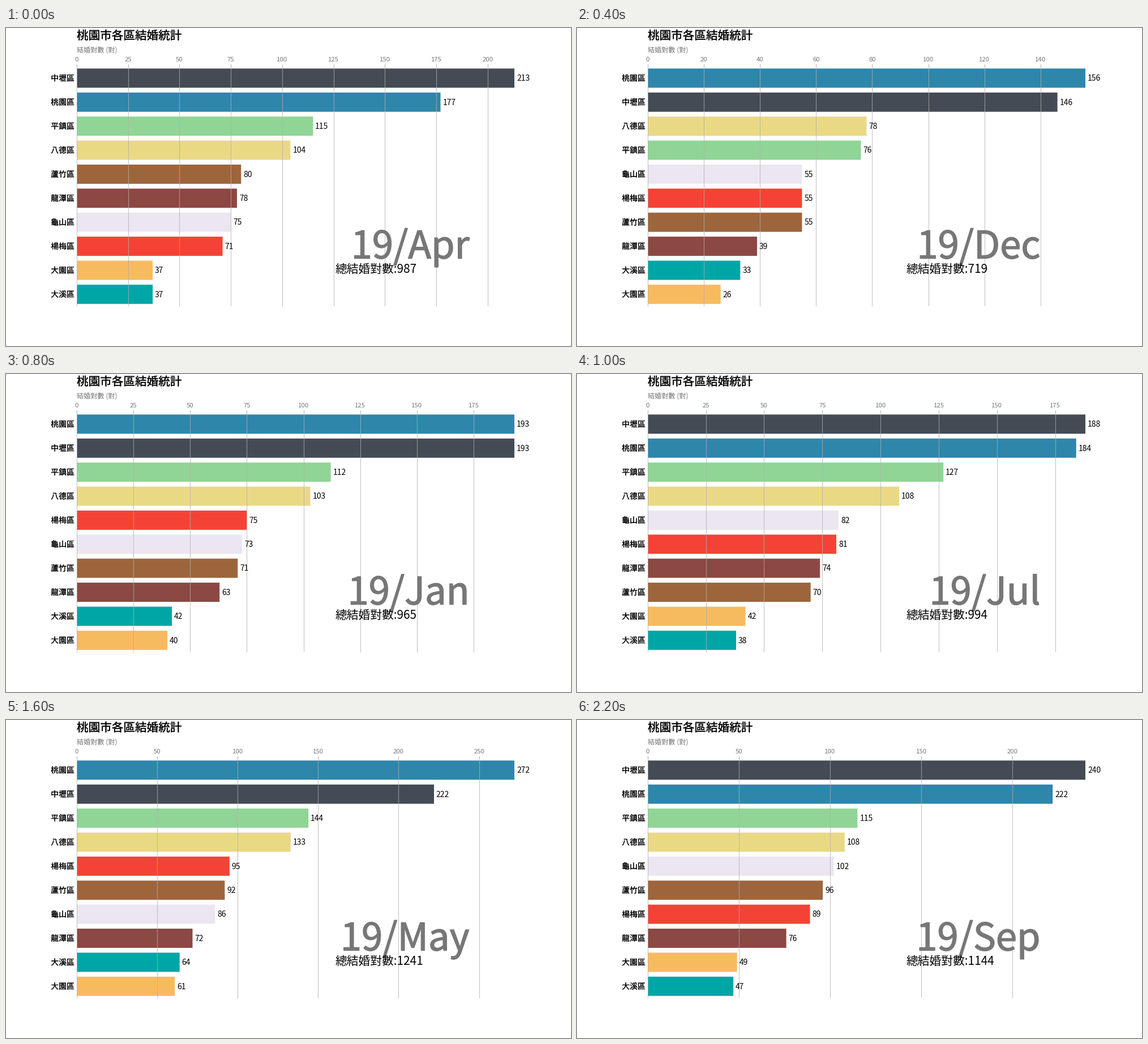
Recreate the animation shown at these times as a matplotlib script. Size 998x561 px, loop 2400 ms.

```python
import numpy as np
import matplotlib.pyplot as plt
from matplotlib.animation import FuncAnimation
from matplotlib.patheffects import withStroke

W, H, DPI = 998, 561, 72  # at 72 dpi one point is one pixel
GREY = "#777777"
MONTHS = "Apr Aug Dec Feb Jan Jul Jun Mar May Nov Oct Sep".split()

COLORS = {
    "桃園區": "#2e86ab", "中壢區": "#444b54", "平鎮區": "#90d595",
    "八德區": "#e9d985", "龜山區": "#ebe6f0", "楊梅區": "#f44336",
    "蘆竹區": "#9d653c", "龍潭區": "#8c4843", "大園區": "#f7bb5f",
    "大溪區": "#00a6a6",
}

# key months: marriages per district, in the order of COLORS
KEYS = {
    "Apr": (177, 213, 115, 104, 75, 71, 80, 78, 37, 37),
    "Aug": (109, 94, 55, 57, 46, 41, 38, 26, 15, 20),
    "Feb": (202, 198, 97, 98, 64, 69, 72, 52, 38, 46),
    "Jul": (184, 188, 127, 108, 82, 81, 70, 74, 42, 38),
    "Jun": (221, 219, 132, 122, 85, 99, 87, 49, 53, 58),
    "May": (272, 222, 144, 133, 86, 95, 92, 72, 61, 64),
    "Sep": (222, 240, 115, 108, 102, 89, 96, 76, 49, 47),
}
KEY_POS = [MONTHS.index(m) for m in KEYS]


def counts(i):
    """Values of month i; months between keys are interpolated."""
    return [round(np.interp(i, KEY_POS, track)) for track in zip(*KEYS.values())]


plt.rcParams["font.family"] = ["Noto Sans CJK JP", "DejaVu Sans"]
fig = plt.figure(figsize=(W / DPI, H / DPI), dpi=DPI, facecolor="white")
ax = fig.add_axes([0.125, 0.125, 0.775, 0.755])


def heavy(color, width):
    return [withStroke(linewidth=width, foreground=color)]


def label(x, y, text, size, color="black", stroke=0, **kw):
    """Text with its baseline at a pixel measured from the top left."""
    if stroke:
        kw["path_effects"] = heavy(color, stroke)
    ax.text(x / W, 1 - y / H, text, size=size, color=color,
            transform=fig.transFigure, **kw)


def bar_label(x, row, text, dx, **kw):
    ax.annotate(text, (x, row), xytext=(dx, -4.8), size=13.86,
                textcoords="offset points", **kw)


def draw(i):
    values = counts(i)
    rows = sorted(zip(COLORS, values), key=lambda r: -r[1])

    ax.clear()
    ax.set_frame_on(False)
    ax.barh(range(10), [v for _, v in rows],
            color=[COLORS[name] for name, _ in rows], snap=False)
    for row, (name, value) in enumerate(rows):
        bar_label(0, row, name, -3.9, ha="right",
                  path_effects=heavy("black", 0.1))
        bar_label(value, row, str(value), 3.9)

    ax.set_xlim(0, rows[0][1])
    ax.set_ylim(9.498, -0.498)
    ax.set_yticks([])
    ax.xaxis.set_ticks_position("top")
    ax.tick_params(axis="x", colors=GREY, labelsize=11.3, length=3,
                   width=0.7, pad=3)
    ax.grid(axis="x", color="#b0b0b0", linewidth=0.8)

    label(125, 20.2, "桃園市各區結婚統計", 20.6, stroke=0.25)
    label(125, 42.5, "結婚對數 (對)", 12.1, GREY)
    label(818.5, 406.5, f"19/{MONTHS[i]}", 67, GREY, stroke=1.4, ha="right")
    label(581.5, 432, f"總結婚對數:{sum(values)}", 20.78)
    return ax.get_children()


anim = FuncAnimation(fig, draw, frames=len(MONTHS), interval=200,
                     init_func=lambda: [], repeat=True, repeat_delay=0)
plt.show()
```
